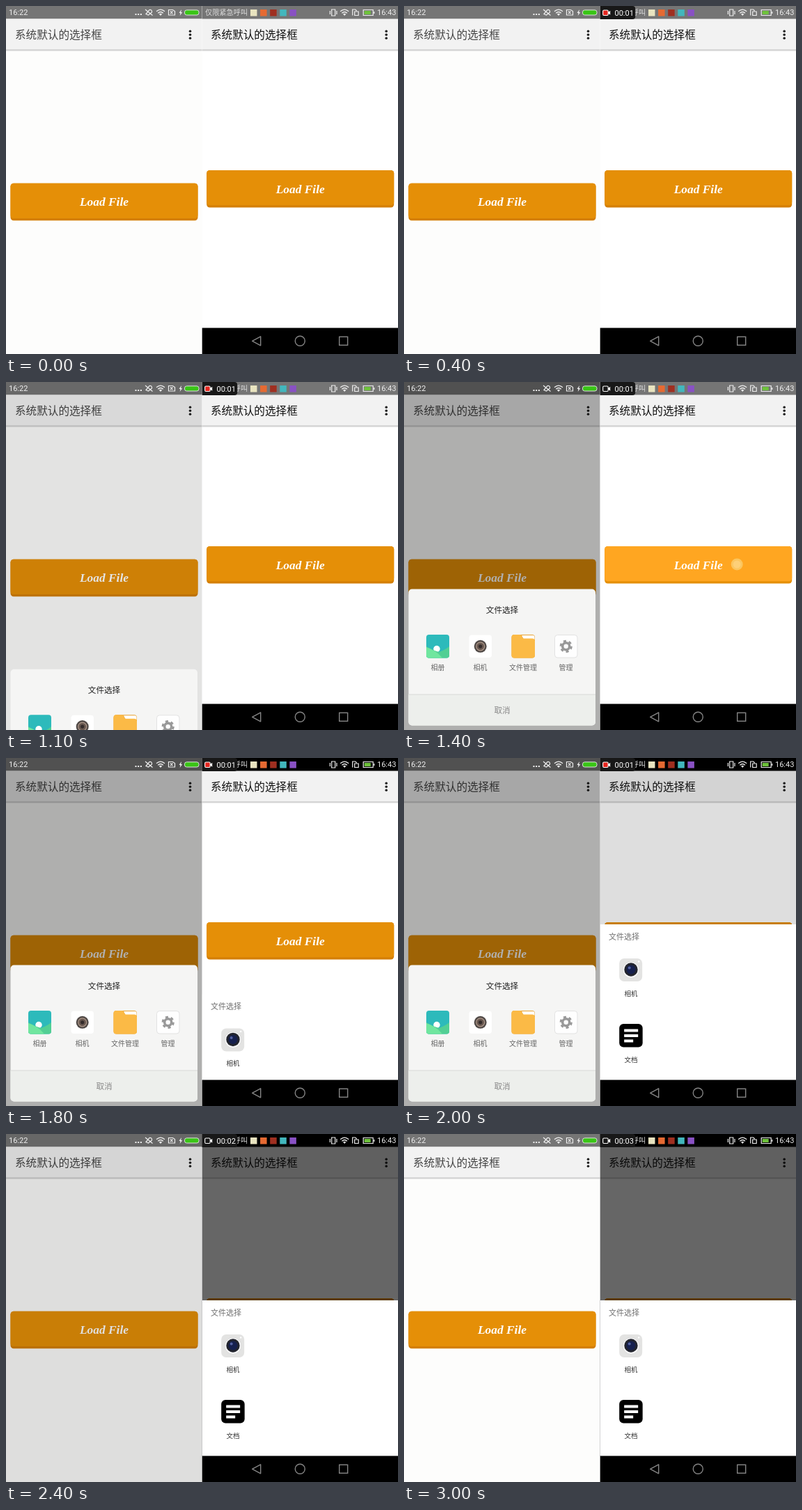
An HTML page that plays this animation: 563 px wide and 500 px high, repeating every 3100 ms.

```html
<!DOCTYPE html>
<html lang="zh">
<head>
<meta charset="utf-8">
<title>系统默认的选择框</title>
<style>
  html, body { margin: 0; width: 100%; height: 100%; overflow: hidden; background: #fff; }
  svg { display: block; width: 563px; height: 500px; }
  text { font-family: "Noto Sans CJK SC", "Noto Sans CJK", sans-serif; }
  .clock { font: 11px Roboto, sans-serif; }
  .load { font: italic bold 17.4px Lobster, "Liberation Serif", serif; fill: #fff; text-anchor: middle; }
  .mid text { text-anchor: middle; }
  .line { fill: none; stroke-width: 1.2; }
</style>
</head>
<body>
<svg viewBox="0 0 563 500">
  <defs>
    <g id="bar">
      <rect y="18.5" width="282" height="44.5" fill="#f2f2f2"/>
      <rect y="62.5" width="282" height="1.3" fill="#c4c4c4"/>
      <rect y="63.8" width="282" height="1.2" fill="#e6e6e6"/>
      <g fill="#222">
        <circle cx="264.5" cy="36.2" r="1.8"/>
        <circle cx="264.5" cy="41.2" r="1.8"/>
        <circle cx="264.5" cy="46.2" r="1.8"/>
      </g>
    </g>
    <g id="button">
      <rect class="edge" x="6.5" width="269" height="53.5" rx="4.5"/>
      <rect class="face" x="6.5" width="269" height="50.3" rx="4.5"/>
      <text class="load" x="141" y="32.5">Load File</text>
    </g>
    <g id="wifi">
      <path class="line" d="M-6-1.2Q0-6.6 6-1.2M-3.8 1.2Q0-2.2 3.8 1.2" stroke="#eee" stroke-width="1.5"/>
      <path d="M-2.2 2.6Q0 .8 2.2 2.6L0 5Z" fill="#eee"/>
    </g>
    <clipPath id="leftClip"><rect width="281.7" height="500"/></clipPath>
    <clipPath id="rightClip"><rect width="282" height="463"/></clipPath>
  </defs>

  <!-- left phone -->
  <g clip-path="url(#leftClip)">
    <rect width="282" height="500" fill="#fdfdfc"/>
    <rect width="282" height="18.5" fill="#757575"/>
    <use href="#bar"/>
    <text x="13" y="47.4" font-size="15.6" fill="#444">系统默认的选择框</text>
    <use id="leftButton" href="#button" y="254.7"/>
    <rect id="leftDim" width="282" height="500"/>

    <g fill="#eee" stroke="#eee" stroke-width="0">
      <text class="clock" x="4" y="13.4">16:22</text>
      <path d="M185.500 11h2v2h-2zM189.200 11h2v2h-2zM192.900 11h2v2h-2z"/>
      <path class="line" d="M201 11.500L206 5.500Q210 5 209.500 9L204.500 13ZM200 5L210.500 13.500"/>
      <use href="#wifi" x="222" y="9"/>
      <path class="line" d="M233.500 5.500h6l3 2v5.500h-9zM236 7.500l3.500 3.500m0-3.500l-3.500 3.500"/>
      <path d="M252 5l-3.500 5h2l-.8 4 3.500-5h-2z"/>
    </g>
    <rect x="256.500" y="5.800" width="20.500" height="7.200" rx="3" fill="#39c516" stroke="#ddd"/>

    <g id="leftSheet" class="mid">
      <rect x="6.5" y="297.500" width="268.500" height="196" rx="5" fill="#f5f5f4"/>
      <path id="cancel" d="M6.500 449H275V488.500a5 5 0 0 1-5 5H11.500a5 5 0 0 1-5-5Z"/>
      <path d="M6.500 449H275" stroke="#d7d9d7"/>
      <text x="141" y="331.500" font-size="11.600" fill="#222">文件选择</text>
      <text x="141" y="475.500" font-size="11.600" fill="#888">取消</text>
      <g font-size="10" fill="#666">
        <text x="48.500" y="414">相册</text>
        <text x="109.500" y="414">相机</text>
        <text x="171" y="414">文件管理</text>
        <text x="232.500" y="414">管理</text>
      </g>
      <rect x="32" y="363" width="33" height="33.500" rx="4" fill="#2dbabb"/>
      <circle cx="47" cy="383.500" r="4.700" fill="#fff"/>
      <path d="M32 380Q40 385 50 388Q57 386 65 380V392.500a4 4 0 0 1-4 4H36a4 4 0 0 1-4-4Z" fill="#52cf94"/>
      <path d="M32 381Q46 385 55 396.500H36a4 4 0 0 1-4-4Z" fill="#70e69f"/>

      <rect x="93.500" y="363.500" width="32.500" height="32.500" rx="4" fill="#fff"/>
      <circle cx="109.700" cy="379.800" r="9" fill="#514a47"/>
      <circle cx="109.700" cy="379.800" r="6" fill="#685850" stroke="#b09a8c" stroke-width="1.200"/>
      <circle cx="109.700" cy="379.800" r="2.600" fill="#332b2b"/>

      <rect x="154.500" y="363" width="33.500" height="33.500" rx="4" fill="#e8a02c"/>
      <path d="M169 364H185q2.500 0 2.500 2.500V370H172Z" fill="#fff"/>
      <path d="M154.500 367a4 4 0 0 1 4-4H167q2 0 2.500 2.500T172 368.500H184a4 4 0 0 1 4 4V392.500a4 4 0 0 1-4 4H158.500a4 4 0 0 1-4-4Z" fill="#fbba46"/>

      <rect x="216.500" y="363.500" width="32.500" height="32.500" rx="4" fill="#fefefe" stroke="#e2e2e2"/>
      <circle cx="232.700" cy="379.800" r="7.600" fill="none" stroke="#999" stroke-width="3" stroke-dasharray="4 3.959"/>
      <circle cx="232.700" cy="379.800" r="5" fill="none" stroke="#999" stroke-width="3.600"/>
    </g>
  </g>

  <!-- right phone -->
  <g transform="translate(281.700)">
    <rect width="282" height="500" fill="#fff"/>
    <use href="#bar"/>
    <text x="12.300" y="47.400" font-size="15.600" fill="#111">系统默认的选择框</text>
    <use id="rightButton" href="#button" y="236"/>
    <g id="touch">
      <circle cx="196.500" cy="262" r="8.500" fill="#fbc65f"/>
      <circle cx="196.500" cy="262" r="5.500" fill="#fdd078"/>
    </g>
    <rect id="rightDim" width="282" height="463"/>
    <g clip-path="url(#rightClip)">
      <g id="rightSheet" class="mid">
        <rect y="239" width="282" height="224" fill="#fff"/>
        <text x="34.300" y="260.700" font-size="11" fill="#707070">文件选择</text>
        <g font-size="9.500" fill="#333">
          <text x="44.300" y="341.800">相机</text>
          <text x="44.300" y="436.500">文档</text>
        </g>
        <rect x="27.500" y="288" width="33" height="33" rx="7" fill="#e3e3e2"/>
        <circle cx="44.300" cy="304.500" r="12" fill="#f5f5f5" stroke="#cfcfcf" stroke-width=".6"/>
        <circle cx="44.300" cy="304" r="9.700" fill="#22242e"/>
        <circle cx="44.300" cy="304" r="6.500" fill="#16204e"/>
        <circle cx="42" cy="301.500" r="2" fill="#5361a0"/>
        <circle cx="55.500" cy="292.500" r="1.200" fill="#fff"/>
        <rect x="27.500" y="382" width="33.500" height="33.500" rx="6" fill="#000"/>
        <path d="M34.500 389.500h20v4h-20zM34.500 397h20v4h-20zM34.500 404.500h13v4h-13z" fill="#fff"/>
      </g>
    </g>

    <rect id="status" width="282" height="18.500"/>
    <text x="4.300" y="13.400" font-size="10.200" fill="#ddd">仅限紧急呼叫</text>
    <g id="apps"></g>
    <g fill="#eee" stroke="#eee" stroke-width="0">
      <path class="line" d="M186 5h5v9h-5zM183.700 7v5M193.300 7v5"/>
      <use href="#wifi" x="204.500" y="9"/>
      <path class="line" d="M216 13.500V5h4l2 2M219 8h5.500v5.500H219z"/>
      <path class="line" d="M231.500 5.500h14v8h-14zM247 8v3"/>
      <text class="clock" x="251.300" y="13.400">16:43</text>
    </g>
    <rect x="233" y="7" width="9" height="5" fill="#6fc33c"/>

    <g id="recorder">
      <path d="M0 0H46.500a4 4 0 0 1 4 4V15a4 4 0 0 1-4 4H0Z" fill="#181818"/>
      <rect id="lamp" x="4" y="6" width="7.500" height="7.500" rx="1.500" stroke="#fff" stroke-width="1.100"/>
      <path d="M11.500 9L14.500 6.800V12.700L11.500 10.500Z" fill="#fff"/>
      <text id="count" class="clock" x="20.800" y="13.700" fill="#fff"></text>
    </g>

    <rect y="462.500" width="282" height="37.500" fill="#000"/>
    <g fill="none" stroke="#858585" stroke-width="1.400">
      <path d="M72 481.300L84 474.800V487.800Z" stroke-linejoin="round"/>
      <circle cx="140.600" cy="481.300" r="7"/>
      <rect x="197" y="475.300" width="12" height="12"/>
    </g>
  </g>
</svg>
<script>
const $ = id => document.getElementById(id);
const LOOP = 3100, STEP = 100;
const ramp = (t, from, to) => Math.min(1, Math.max(0, (t - from) / (to - from)));
const easeOut = x => 1 - (1 - x) ** 2;
const within = (t, from, to) => t >= from && t < to;

$('apps').innerHTML = ['#e9e4c0', '#e66a32', '#9f2f20', '#42b7bd', '#8951c4']
  .map((c, i) => `<rect x="${69.3 + 14.1 * i}" y="5" width="9.5" height="9.5" fill="${c}"/>`).join('');

// Each button gets its own copy so that its colours can change.
function makeButton(id) {
  const use = $(id), g = $('button').cloneNode(true);
  g.removeAttribute('id');
  g.setAttribute('transform', `translate(0 ${use.getAttribute('y')})`);
  use.replaceWith(g);
  const face = g.querySelector('.face'), edge = g.querySelector('.edge');
  return pressed => {
    face.setAttribute('fill', pressed ? '#ffa621' : '#e58f07');
    edge.setAttribute('fill', pressed ? '#e58f07' : '#d47f05');
  };
}
const pressLeft = makeButton('leftButton');
const pressRight = makeButton('rightButton');

const set = (id, name, value) => $(id).setAttribute(name, value);
const show = (id, on) => set(id, 'visibility', on ? 'visible' : 'hidden');
const slide = (id, y) => set(id, 'transform', `translate(0 ${y})`);

function draw(t) {
  pressLeft(within(t, 900, 1100));
  pressRight(within(t, 1300, 1700));
  show('touch', within(t, 1400, 1600));

  set('leftDim', 'opacity', 0.31 * (ramp(t, 1000, 1300) - ramp(t, 2200, 2530)));
  slide('leftSheet', 205 * (1 - easeOut(ramp(t, 1000, 1400)) + ramp(t, 2200, 2400) ** 2));
  set('cancel', 'fill', t >= 2100 ? '#dee1de' : '#edefec');

  set('rightDim', 'opacity', 0.6 * ramp(t, 1910, 2325));
  slide('rightSheet', 226 * (1 - easeOut(ramp(t, 1700, 2000))));
  set('status', 'fill', t >= 1800 ? '#000' : '#757575');

  show('recorder', t >= 100);
  const red = within(t, 400, 1300) || within(t, 1800, 2300) || within(t, 2700, 2900);
  set('lamp', 'fill', red ? '#e5261f' : '#181818');
  const seconds = [200, 2300, 2900].filter(at => t >= at).length;
  $('count').textContent = '00:0' + seconds;
}

const start = performance.now();
function tick() {
  const t = (performance.now() - start) % LOOP;
  draw(Math.floor(t / STEP) * STEP);
  requestAnimationFrame(tick);
}
tick();
</script>
</body>
</html>
```
